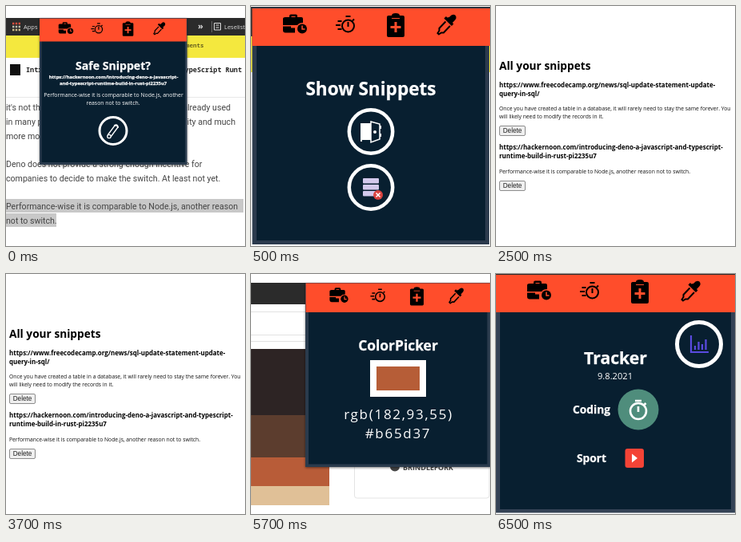
Animation of 299x301 px, one loop 8 s. Source, as an HTML page:

```html
<!DOCTYPE html>
<html lang="en">
<head>
<meta charset="utf-8">
<title>Snippet tools</title>
<style>
  html, body { margin: 0; width: 100%; height: 100%; overflow: hidden; background: #fff; }
  svg { display: block; width: 100vw; height: 100vh; }
  text { font-family: "Open Sans", "Noto Sans", sans-serif; white-space: pre; }
  .b { font-weight: 700; }
  .mid { text-anchor: middle; fill: #fff; }
  .mid.b, .mid .b { stroke: #fff; stroke-width: .25; }
  .end { text-anchor: end; }
  .article text { font: 10.6px Roboto, sans-serif; fill: #444; }
  .mono { font: 700 8.5px "Noto Sans Mono", monospace; }
  .head { font-size: 7.94px; font-weight: 700; }
  .para { font-size: 6.78px; fill: #111; }
  .btn { font: 8.2px "Liberation Sans", Arial, sans-serif; fill: #222; }
  .ring { fill: none; stroke: #fff; }
  .scene { display: none; }
</style>
</head>
<body>
<svg viewBox="0 0 299 301" preserveAspectRatio="none">
  <defs>
    <g id="bar">
      <path d="M1.5 3H300V50H1.5z" fill="#ff4d2b"/>
      <!-- briefcase with clock -->
      <path d="M43 14h5v-1.500q0-2 2-2h6q2 0 2 2V14h5q2 0 2 2v5q-5 0-7 3H40v-8q0-2 3-2zM50.500 13v1h5v-1zM40 25.500h10v2h5v6H43q-3 0-3-3z" fill-rule="evenodd"/>
      <circle cx="64" cy="28.500" r="6"/>
      <path d="M64 24.500v4.500h3.500" fill="none" stroke="#ff4d2b" stroke-width="1.500"/>
      <!-- stopwatch -->
      <g fill="none" stroke="#000" stroke-width="2">
        <circle cx="121.500" cy="25" r="7.500"/>
        <path d="M118.500 13h6M121.500 20v6M127 18.500l2-2M108.500 19h5M106 24h6M108.500 29h5"/>
      </g>
      <!-- clipboard -->
      <g transform="translate(-1 1)">
        <path d="M173 11h4q0-3 5-3t5 3h4q2 0 2 2v23q0 2-2 2h-18q-2 0-2-2V13q0-2 2-2z"/>
        <path d="M182 19v13M175.500 25.500h13" stroke="#ff4d2b" stroke-width="3"/>
        <path d="M177 14.500h10" stroke="#ff4d2b"/>
      </g>
      <!-- eyedropper -->
      <path d="M248 14q4-5 7.500-2.500 3 3.500-1.500 7.500l-2 2 1.500 1.500-2.500 2.500-9.500-9.500 2.500-2.500 1.500 1.500z"/>
      <path d="M243.500 19.500l-8 8.500v3l-2 3 1.500 1.500 3-2h3l8-8.500" fill="none" stroke="#000" stroke-width="2"/>
    </g>
    <filter id="shade" x="-10%" y="-10%" width="120%" height="120%">
      <feDropShadow dx="0" dy="1" stdDeviation="1.500" flood-opacity=".5"/>
    </filter>
  </defs>

  <g class="scene">
    <path d="M0 15H299V37H0z" fill="#2b2b2b"/>
    <g stroke-width="2.400" stroke-dasharray="2.400 1.400">
      <path d="M8 22h10" stroke="#e0503f"/>
      <path d="M8 26h10" stroke="#bba"/>
      <path d="M8 30h10" stroke="#cb8"/>
    </g>
    <text x="22" y="28.500" font-size="7.500" fill="#ddd">Apps</text>
    <text x="240" y="29" font-size="11" class="b" fill="#ddd">»</text>
    <path d="M257.500 19V33" stroke="#666"/>
    <path d="M260.500 21.500h8v8.500h-8zM262.500 24h4M262.500 27h4" fill="none" stroke="#ddd"/>
    <text x="273" y="28.500" font-size="7.500" fill="#ddd">Leseliste</text>
    <path d="M0 37H299V65H0z" fill="#f4e83e"/>
    <text x="247.500" y="51.500" class="mono end" style="font-size:7.500px" fill="#6b6520">comments</text>
    <rect x="5" y="73" width="13" height="14" fill="#111"/>
    <text x="25" y="82.500" class="mono" fill="#222">Intr</text>
    <text x="295" y="82.500" class="mono end" fill="#222">TypeScript Runt</text>
    <path d="M0 114.500H299" stroke="#e8e8e8"/>
    <path d="M0 242H297V259H0zM0 260H63V277H0z" fill="#c8c8c8"/>
    <g class="article">
      <text y="131">it's not the</text><text x="281" y="131" class="end">already used</text>
      <text y="149">in many pr</text><text x="287" y="149" class="end">ity and much</text>
      <text y="167">more mod</text>
      <text y="202">Deno does not provide a strong enough incentive for</text>
      <text y="220">companies to decide to make the switch. At least not yet.</text>
      <text y="255">Performance-wise it is comparable to Node.js, another reason</text>
      <text y="273">not to switch.</text>
    </g>
    <path d="M42 15H226.500V199H42z" fill="#2b3a4d" filter="url(#shade)"/>
    <path d="M44.500 43H224V196H44.500z" fill="#081f30"/>
    <use href="#bar" transform="translate(41.100 13.800) scale(.616)"/>
    <g class="mid">
      <text x="134" y="80" class="b" font-size="14.100">Safe Snippet?</text>
      <g class="b" font-size="5.850">
        <text x="134.500" y="91">https://hackernoon.com/introducing-deno-a-javascript-</text>
        <text x="134" y="99">and-typescript-runtime-build-in-rust-pi2235u7</text>
      </g>
      <text x="134.500" y="114" font-size="6.900">Performance-wise it is comparable to Node.js, another</text>
      <text x="134" y="124" font-size="6.900">reason not to switch.</text>
    </g>
    <circle class="ring" cx="134" cy="156.500" r="17" stroke-width="3"/>
    <!-- safety pin -->
    <g class="ring" stroke-width="1.300" stroke-linecap="round">
      <circle cx="129" cy="163.500" r="2.200"/>
      <path d="M127.500 161.500L136 150M131.500 163.500L140 152"/>
      <path d="M136 150q3-2 4 2" stroke-width="2.200"/>
    </g>
  </g>

  <g class="scene">
    <path d="M0 1H299V38H0z" fill="#2b2b2b"/>
    <path d="M0 38H299V83H0z" fill="#f4e83e"/>
    <path d="M1.500 2H298V299H1.500z" fill="#2b3a4d"/>
    <path d="M7 49H293V294H7z" fill="#081f30"/>
    <use href="#bar"/>
    <text x="150" y="112" class="mid b" font-size="22.600">Show Snippets</text>
    <g class="ring" stroke-width="4.500">
      <circle cx="150" cy="157.500" r="27.200"/>
      <circle cx="150" cy="227.500" r="27.200"/>
    </g>
    <path d="M137 147h13v21h-11v2h-2z" fill="#fff"/>
    <path d="M150 145l11 3v19l-11 4z" fill="#081f30" stroke="#fff" stroke-width="1.500"/>
    <circle cx="155" cy="158" r="2" fill="#fff"/>
    <path d="M162 150v4M162 160v4" stroke="#fff" stroke-width="2"/>
    <g fill="#d3c9ec">
      <rect x="140" y="216" width="20" height="6.500" rx="1"/>
      <rect x="140" y="224" width="20" height="6.500" rx="1"/>
      <rect x="140" y="232" width="20" height="6.500" rx="1"/>
    </g>
    <circle cx="159" cy="237" r="6" fill="#d9433f"/>
    <path d="M156.500 234.500l5 5m0-5l-5 5" stroke="#fff" stroke-width="1.500"/>
  </g>

  <g class="scene">
    <text x="4" y="80" class="b" font-size="13.700">All your snippets</text>
    <text x="4" y="102" class="head">https://www.freecodecamp.org/news/sql-update-statement-update-</text>
    <text x="4" y="113" class="head">query-in-sql/</text>
    <text x="4" y="131" class="para">Once you have created a table in a database, it will rarely need to stay the same forever. You</text>
    <text x="4" y="141" class="para">will likely need to modify the records in it.</text>
    <text x="4" y="180" class="head">https://hackernoon.com/introducing-deno-a-javascript-and-typescript-</text>
    <text x="4" y="191" class="head">runtime-build-in-rust-pi2235u7</text>
    <text x="4" y="210" class="para">Performance-wise it is comparable to Node.js, another reason not to switch.</text>
    <g fill="#efefef" stroke="#8c8c8c">
      <rect x="4.500" y="150.500" width="32" height="12" rx="1.500"/>
      <rect x="4.500" y="219.500" width="32" height="12" rx="1.500"/>
    </g>
    <text x="8.700" y="159" class="btn">Delete</text>
    <text x="8.700" y="228" class="btn">Delete</text>
  </g>

  <g class="scene">
    <path d="M0 11H299V38H0z" fill="#2b2b2b"/>
    <path d="M0 47.500H70M0 76.500H70M0 84.500H70" stroke="#e2e2e2"/>
    <path d="M0 94H98V178H0z" fill="#2d2424"/>
    <path d="M0 177H98V231H0z" fill="#5c3d2e"/>
    <path d="M0 230H98V267H0z" fill="#b85c38"/>
    <path d="M0 266H98V290H0z" fill="#e0c097"/>
    <path d="M129.500 230V278q0 3 3 3H295q3 0 3-3V230" fill="none" stroke="#e4e4e4"/>
    <circle cx="180" cy="241.500" r="6" fill="#444"/>
    <text x="190" y="246" class="b" font-size="9" fill="#444">BRINDLEFORK</text>
    <path d="M68 11H300V242H68z" fill="#2b3a4d" filter="url(#shade)"/>
    <path d="M72 48H295.500V238.500H72z" fill="#081f30"/>
    <use href="#bar" transform="translate(67.400 9.200) scale(.774)"/>
    <g class="mid">
      <text x="184" y="96" class="b" font-size="17.400">ColorPicker</text>
      <g font-size="17" letter-spacing="1.700">
        <text x="184.500" y="182">rgb(182,93,55)</text>
        <text x="184" y="206">#b65d37</text>
      </g>
    </g>
    <path d="M149 108H219V154H149z" fill="#fff"/>
    <path d="M157 116H211V146H157z" fill="#b65d37"/>
  </g>

  <g class="scene">
    <path d="M0 0H299V299.500H0z" fill="#344255"/>
    <path d="M0 0H299V1H0z" fill="#2b2b2b"/>
    <path d="M5 48H294V295H5z" fill="#081f30"/>
    <path d="M0 1H299V48H0z" fill="#ff4d2b"/>
    <use href="#bar" transform="translate(-1 -2)"/>
    <g class="mid">
      <text x="149.500" y="113" class="b" font-size="21.200">Tracker</text>
      <text x="149" y="132" font-size="11.100">9.8.2021</text>
      <g class="b" font-size="13.800">
        <text x="119.500" y="175">Coding</text>
        <text x="119.500" y="236">Sport</text>
      </g>
    </g>
    <circle class="ring" cx="254" cy="88" r="27.500" stroke-width="5"/>
    <path d="M244 77V98H266M249 95v-5M253.500 95v-10M258 95v-7M262.500 95v-13" fill="none" stroke="#5a4be0" stroke-width="2.200"/>
    <circle cx="178" cy="170" r="25.500" fill="#4f8d7c"/>
    <g class="ring" stroke-width="2.600">
      <circle cx="178" cy="172" r="10"/>
      <path d="M174 159h8M178 166v7M185.500 164l2-2"/>
    </g>
    <rect x="161.500" y="219" width="23.500" height="24" rx="3" fill="#f44336"/>
    <path d="M170 225.500l7 5.500-7 5.500z" fill="#fff"/>
  </g>
</svg>
<script>
  const scenes = document.querySelectorAll('.scene');
  const starts = [0, 500, 2500, 4500, 6500];
  const loop = 8000;

  function draw() {
    const t = performance.now() % loop;
    const now = starts.findLastIndex(s => t >= s);
    scenes.forEach((g, i) => { g.style.display = i === now ? 'inline' : 'none'; });
    requestAnimationFrame(draw);
  }
  draw();
</script>
</body>
</html>
```
